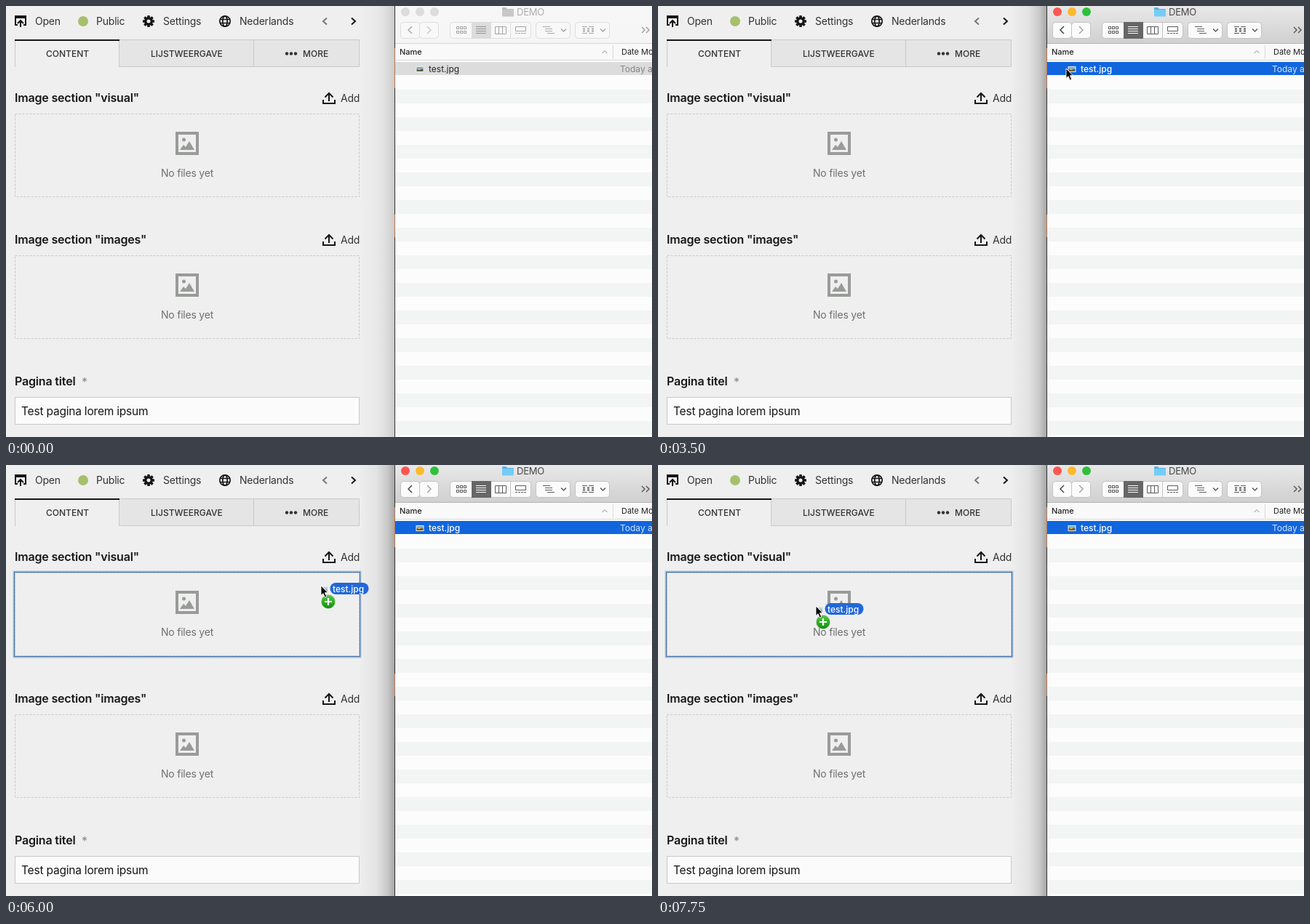
An HTML page that plays this animation: 888x593 px, repeating every 8 s.

```html
<!DOCTYPE html>
<html lang="en">
<head>
<meta charset="utf-8">
<title>Drag a file into an image section</title>
<style>
  html, body { margin: 0; width: 100%; height: 100%; overflow: hidden; background: #efefef; }
  svg { display: block; width: 888px; height: 593px; font-family: Inter, sans-serif; }
  text { white-space: pre; }
  .nav { font-size: 14px; letter-spacing: -.015em; fill: #333; }
  .tab { font-size: 12px; font-weight: 500; fill: #333; }
  .label { font-size: 16px; font-weight: 600; letter-spacing: -.011em; fill: #161616; }
  .hint { font-size: 14px; letter-spacing: -.015em; fill: #707070; }
  .input { font-size: 15.5px; letter-spacing: -.2px; fill: #161616; }
  .small { font-size: 12px; }
  .line { fill: none; stroke: #161616; stroke-width: 2; }
  .border { fill: none; stroke: #c9c9c9; }

  #stage {
    --bar-top: #f7f7f7; --bar-bottom: #f5f5f5; --bar-line: #d6d6d6;
    --red: #dcdcdc; --yellow: #dcdcdc; --green: #dcdcdc;
    --folder: #c8c8c8; --folder-tab: #bdbdbd; --title: #aeaeae;
    --button: #f8f8f8; --button-line: #dedede; --icon: #a5a5a5; --arrow: #aaa;
    --pressed: #dcdcdc; --pressed-icon: #8f8f8f;
    --row: #dcdcdc; --file: #262626; --date: #858585; --file-weight: 400;
    --shadow: .16;
  }
  #stage.active {
    --bar-top: #e9e8e9; --bar-bottom: #d1d0d1; --bar-line: #b5b5b5;
    --red: #fc5650; --yellow: #fdb92c; --green: #2fc03c;
    --folder: #74ccf6; --folder-tab: #52b5e6; --title: #474747;
    --button: #fbfbfb; --button-line: #c2c2c2; --icon: #5c5c5c; --arrow: #4a4a4a;
    --pressed: #666; --pressed-icon: #fff;
    --row: #1166de; --file: #fff; --date: #d3e4fb; --file-weight: 500;
    --shadow: .32;
  }
  .button { fill: var(--button); stroke: var(--button-line); }
  .icon { fill: none; stroke: var(--icon); }
</style>
</head>
<body>
<svg id="stage" viewBox="0 0 888 593">
  <defs>
    <linearGradient id="bar" x2="0" y2="1">
      <stop style="stop-color:var(--bar-top)"/>
      <stop offset="1" style="stop-color:var(--bar-bottom)"/>
    </linearGradient>
    <linearGradient id="shade">
      <stop stop-opacity="0"/>
      <stop offset=".5" stop-opacity=".16"/>
      <stop offset=".8" stop-opacity=".52"/>
      <stop offset="1"/>
    </linearGradient>
    <linearGradient id="plus" x2="0" y2="1">
      <stop stop-color="#5cc84a"/><stop offset="1" stop-color="#0d8f0c"/>
    </linearGradient>
    <g id="picture">
      <path d="M0 0H11V8H0Z" fill="#e9eef2"/>
      <path d="M1 1H10V4H1Z" fill="#77a9cf"/>
      <path d="M1 4H10V7H1Z" fill="#695d38"/>
      <path d="M3 3H6V5H3Z" fill="#e4b842"/>
    </g>
    <g id="section">
      <path class="line" d="M436 129V134H452V129M444 131V120M438.5 125.5L444 120L449.500 125.500"/>
      <text class="nav" x="460" y="132">Add</text>
      <rect class="border" x="12.500" y="148.500" width="473" height="114" stroke-dasharray="3 2"/>
      <rect x="235" y="175" width="28" height="28" fill="none" stroke="#999b99" stroke-width="4"/>
      <circle cx="244.500" cy="184" r="2.500" fill="#999b99"/>
      <path d="M239 198L244 191L247 194L252 186L259 198Z" fill="#999b99"/>
      <text class="hint" x="249" y="235" text-anchor="middle">No files yet</text>
    </g>
  </defs>

  <rect width="888" height="593" fill="#efefef"/>

  <!-- page header -->
  <path class="line" d="M16 26H13V15H27V26H24M20 29V20M16 24L20 20L24 24"/>
  <path d="M12 13H28V17H12Z" fill="#161616"/>
  <circle cx="106" cy="21" r="7" fill="#a6bf6d"/>
  <g id="gear" transform="translate(196 21)" fill="#161616">
    <circle r="4.200" fill="none" stroke="#161616" stroke-width="3.400"/>
  </g>
  <g class="line" style="stroke-width:1.7">
    <circle cx="301" cy="21" r="7.200"/>
    <ellipse cx="301" cy="21" rx="3.200" ry="7.200"/>
    <path d="M294 18.500H308M294 23.500H308"/>
  </g>
  <path class="line" d="M441 16.500L436 21L441 25.500" style="stroke:#777"/>
  <path class="line" d="M475 16.500L480 21L475 25.500"/>
  <g class="nav">
    <text x="40" y="26">Open</text><text x="124" y="26">Public</text>
    <text x="216" y="26">Settings</text><text x="321" y="26">Nederlands</text>
  </g>

  <!-- tabs -->
  <path d="M156 46H486V84H156Z" fill="#e5e5e5"/>
  <path class="border" d="M155.500 46.500H485.500V83.500H155.500V46M340.500 46V84M12.500 46V84"/>
  <path d="M12 46H156V48H12Z" fill="#161616"/>
  <g class="tab">
    <text x="55" y="70">CONTENT</text>
    <text x="199" y="70">LIJSTWEERGAVE</text>
    <text x="408" y="70">MORE</text>
    <circle cx="386" cy="65.500" r="2.200"/><circle cx="392" cy="65.500" r="2.200"/><circle cx="398" cy="65.500" r="2.200"/>
  </g>

  <!-- form -->
  <text class="label" x="12" y="132">Image section "visual"</text>
  <use href="#section"/>
  <text class="label" x="12" y="327">Image section "images"</text>
  <use href="#section" y="195"/>
  <text class="label" x="12" y="522">Pagina titel</text>
  <text x="104" y="523" font-size="16" fill="#888">*</text>
  <rect x="12.500" y="538.500" width="473" height="37" fill="#fbfbfb" stroke="#c9c9c9"/>
  <text class="input" x="21" y="563">Test pagina lorem ipsum</text>
  <g id="dropzone" fill="none">
    <rect x="11" y="147" width="476" height="117" stroke="#a9c0db" stroke-width="3"/>
    <rect x="11.500" y="147.500" width="475" height="116" stroke="#4673a8"/>
  </g>

  <!-- file window -->
  <rect x="484" width="51" height="593" fill="url(#shade)" style="opacity:var(--shadow)"/>
  <rect x="535" width="353" height="593" fill="#fcfcfc"/>
  <g id="stripes" fill="#f3f4f4"></g>
  <rect x="535" width="353" height="51" fill="url(#bar)"/>
  <path d="M535 51.500H888" style="stroke:var(--bar-line)"/>
  <circle cx="549" cy="8" r="6" style="fill:var(--red)"/>
  <circle cx="569" cy="8" r="6" style="fill:var(--yellow)"/>
  <circle cx="589" cy="8" r="6" style="fill:var(--green)"/>
  <path d="M682 4V3Q682 2 683 2H687L689 4H697Q698 4 698 5V7H682Z" style="fill:var(--folder-tab)"/>
  <rect x="682" y="5" width="16" height="9.500" rx="1" style="fill:var(--folder)"/>
  <text x="702" y="13" font-size="13" letter-spacing="-.2" style="fill:var(--title)">DEMO</text>

  <g class="button">
    <rect x="542.500" y="22.500" width="26" height="22" rx="4"/>
    <rect x="568.500" y="22.500" width="26" height="22" rx="4"/>
    <rect x="610.500" y="22.500" width="111" height="22" rx="4"/>
    <rect x="728.500" y="22.500" width="47" height="22" rx="4"/>
    <rect x="782.500" y="22.500" width="47" height="22" rx="4"/>
    <path d="M693.500 23V44"/>
  </g>
  <rect x="640" y="22" width="27" height="23" style="fill:var(--pressed)"/>
  <path d="M646 28.500H660M646 31.500H660M646 34.500H660M646 37.500H660" style="stroke:var(--pressed-icon)"/>
  <g class="icon">
    <path d="M558 28L553 33L558 38" stroke-width="1.500" style="stroke:var(--arrow)"/>
    <path d="M579 28L584 33L579 38" stroke-width="1.300" opacity=".6"/>
    <g id="grid"></g>
    <path d="M672.500 28.500H687.500V38.500H672.500ZM677.500 28V39M682.500 28V39"/>
    <path d="M700.500 28.500H714.500V34.500H700.500ZM700 37.500H703M704 37.500H707M708 37.500H711M712 37.500H715"/>
    <path d="M738 28.500H748M741 31.500H751M741 34.500H751M744 37.500H754"/>
    <path d="M792 28.500H808M792 37.500H808" stroke-dasharray="7 2"/>
    <path d="M793 31.500H808M793 34.500H808" stroke-width="2" stroke-dasharray="3 3"/>
    <path d="M763 31.500L766.500 35L770 31.500M817 31.500L820.500 35L824 31.500M874 29L878 33L874 37M880 29L884 33L880 37" stroke-width="1.500"/>
  </g>

  <path d="M535 52H888V74H535Z" fill="#f9f9f9"/>
  <path d="M535 74.500H888M834.500 54V73" stroke="#d8d8d8"/>
  <path d="M819.500 65L823 61.500L826.500 65" fill="none" stroke="#8a8a8a"/>
  <text x="541" y="67" font-size="11" font-weight="500" fill="#222">Name</text>
  <text x="846" y="67" font-size="11" fill="#222">Date Modified</text>
  <rect x="535" y="77" width="353" height="18" style="fill:var(--row)"/>
  <use href="#picture" x="563.500" y="83"/>
  <text class="small" x="581" y="91" style="fill:var(--file);font-weight:var(--file-weight)">test.jpg</text>
  <text class="small" x="844" y="91" style="fill:var(--date)">Today at</text>
  <path d="M534.500 0V593" stroke="#343434"/>
  <path d="M534.500 58V113M534.500 287V318" stroke="#b9764d"/>

  <!-- pointer, with its tip at 0,0 -->
  <g id="pointer">
    <g id="cargo">
      <use href="#picture" x="-1" y="1" opacity=".45"/>
      <rect x="12.500" y="-4" width="53" height="16" rx="8" fill="#2268d8"/>
      <text class="small" x="16" y="8.500" font-weight="500" fill="#fff">test.jpg</text>
      <circle cx="10" cy="22" r="9.700" fill="url(#plus)" stroke="#d9e6d5" stroke-width=".6"/>
      <path d="M5 22H15M10 17V27" stroke="#fff" stroke-width="2.200"/>
    </g>
    <path d="M0 0V13.500L3 10.700L5.300 16L7.700 15L5.400 9.700H9.500Z" fill="#000" stroke="#fff" stroke-width=".9"/>
  </g>
</svg>
<script>
  const LOOP = 8000, STEP = 250;
  const ACTIVATE = 2500, DRAG = 5250, HOVER = 5750;

  // Pointer stops: [time, x, y]; each holds until the next.
  const stops = [
    [1000, 440, 50], [1250, 497, 77], [1500, 524, 80], [1750, 569, 135],
    [2750, 571, 127], [3000, 572, 104], [3250, 562, 88], [3500, 561, 86],
    [4250, 559, 86], [5000, 560, 89], [5250, 548, 124], [5500, 537, 132],
    [5750, 444, 157], [6000, 433, 166], [6250, 339, 190], [6500, 325, 196],
    [6750, 265, 202], [7000, 262, 201], [7250, 235, 191], [7500, 218, 193],
    [7750, 217, 194]
  ];

  const byId = id => document.getElementById(id);
  const repeat = (count, draw) => Array.from({ length: count }, (_, i) => draw(i)).join('');
  const show = (node, visible) => node.style.display = visible ? '' : 'none';
  const [stage, pointer, cargo, dropzone] = ['stage', 'pointer', 'cargo', 'dropzone'].map(byId);

  byId('stripes').innerHTML = repeat(13, i =>
    `<rect x="535" y="${115 + 38 * i}" width="353" height="19"/>`);
  byId('gear').innerHTML += repeat(8, i =>
    `<rect x="-1.800" y="-8" width="3.600" height="4" rx=".6" transform="rotate(${45 * i})"/>`);
  byId('grid').innerHTML = repeat(6, i =>
    `<rect x="${619.5 + 5 * (i % 3)}" y="${i < 3 ? 28.5 : 34.5}" width="3" height="3"/>`);

  function draw(now) {
    const time = Math.floor(now % LOOP / STEP) * STEP;
    const stop = stops.findLast(([start]) => start <= time);
    stage.classList.toggle('active', time >= ACTIVATE);
    show(pointer, stop);
    if (stop) pointer.setAttribute('transform', `translate(${stop[1]} ${stop[2]})`);
    show(cargo, time >= DRAG);
    show(dropzone, time >= HOVER);
  }

  const origin = performance.now();
  function tick() {
    draw(performance.now() - origin);
    requestAnimationFrame(tick);
  }
  tick();
</script>
</body>
</html>
```
